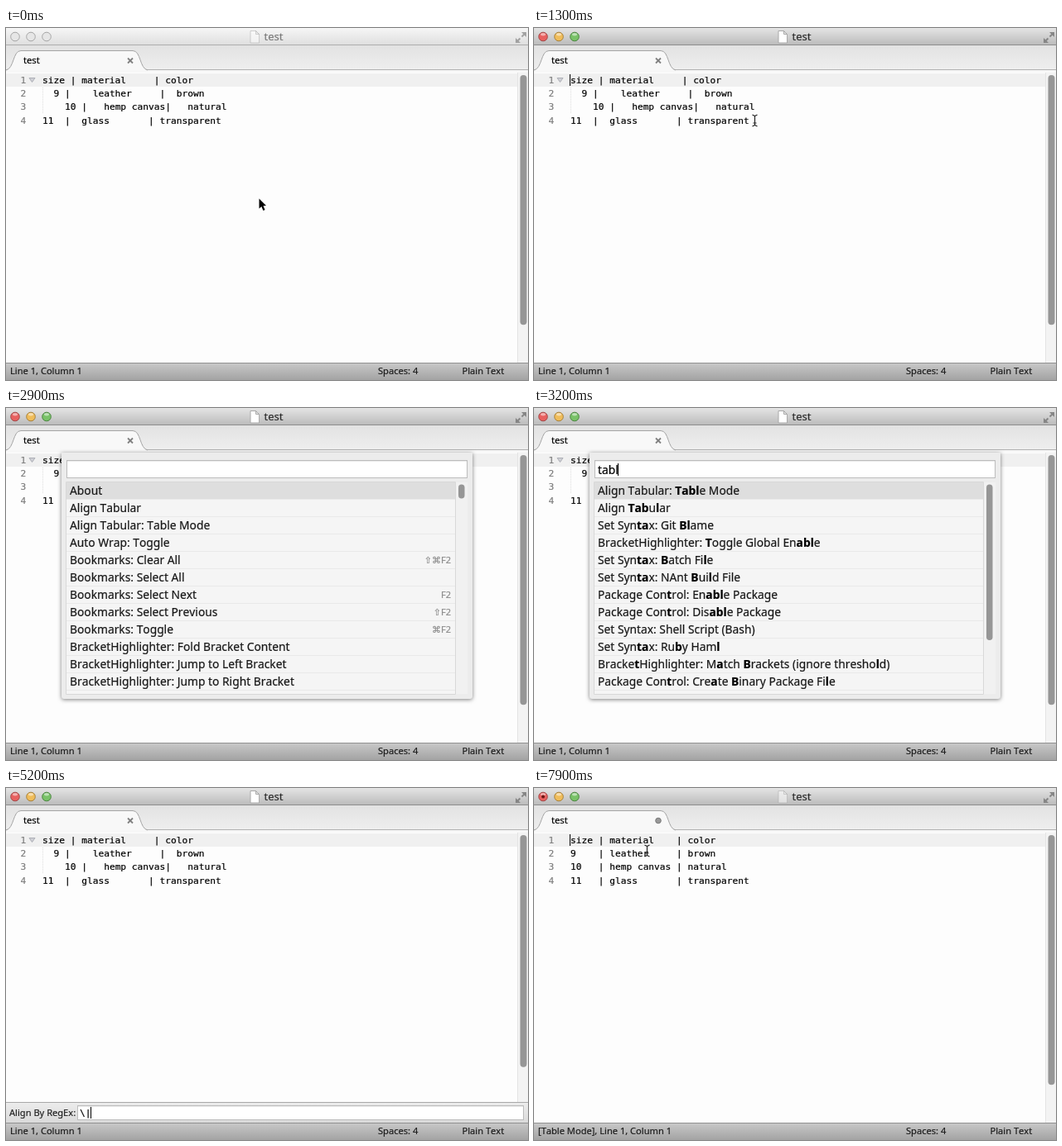
Recreate the animation shown at these times as an HTML page with a canvas. Size 630x426 px, loop 8 s.

```html
<!DOCTYPE html>
<html lang="en">
<head>
<meta charset="utf-8">
<title>Table alignment</title>
<style>
html, body { margin: 0; width: 100%; height: 100%; overflow: hidden; background: #fdfdfd; }
canvas { display: block; }
</style>
</head>
<body>
<canvas id="stage" width="630" height="426"></canvas>
<script>
const ctx = document.getElementById('stage').getContext('2d');
const LOOP = 8000;
const SANS = '"Noto Sans", "Open Sans", "DejaVu Sans", sans-serif';
const MONO = '11.2px "DejaVu Sans Mono", "Liberation Mono", monospace';
const LINE = 16.33, CHAR = 6.742;

const RAGGED = [
  'size | material     | color',
  '  9 |    leather     |  brown',
  '    10 |   hemp canvas|   natural',
  '11  |  glass       | transparent',
];
const ALIGNED = [
  'size | material    | color',
  '9    | leather     | brown',
  '10   | hemp canvas | natural',
  '11   | glass       | transparent',
];

// Asterisks enclose bold letters; a bar separates the shortcut.
const ALL_COMMANDS = [
  'About', 'Align Tabular', 'Align Tabular: Table Mode', 'Auto Wrap: Toggle',
  'Bookmarks: Clear All|⇧⌘F2', 'Bookmarks: Select All', 'Bookmarks: Select Next|F2',
  'Bookmarks: Select Previous|⇧F2', 'Bookmarks: Toggle|⌘F2',
  'BracketHighlighter: Fold Bracket Content', 'BracketHighlighter: Jump to Left Bracket',
  'BracketHighlighter: Jump to Right Bracket',
];
const TABL_COMMANDS = [
  'Align Tabular: *Tabl*e Mode', 'Align *Tab*u*l*ar', 'Set Syn*ta*x: Git *Bl*ame',
  'BracketHighlighter: *T*oggle Global En*abl*e', 'Set Syn*ta*x: *B*atch Fi*l*e',
  'Set Syn*ta*x: NAnt *B*ui*l*d File', 'Package Con*t*rol: En*abl*e Package',
  'Package Con*t*rol: Dis*abl*e Package', 'Set Syntax: Shell Script (Bash)',
  'Set Syn*ta*x: Ru*b*y Ham*l*', 'Bracke*t*Highlighter: M*a*tch *B*rackets (ignore thresho*l*d)',
  'Package Con*t*rol: Cre*a*te *B*inary Package Fi*l*e',
];
const TABLE_COMMANDS = [
  'Align Tabular: *Table* Mode', 'BracketHighlighter: *T*oggle Global En*able*',
  'Package Con*t*rol: En*able* Package', 'Package Con*t*rol: Dis*able* Package',
  'Set Syn*ta*x: Git *Bl*am*e*', 'Set Syn*ta*x: *B*atch Fi*le*', 'Set Syn*ta*x: NAnt *B*uild Fi*le*',
  'Package Con*t*rol: Cre*a*te *B*inary Package Fi*le*',
  'Bracke*t*Highlighter: Select Next *A*ttri*b*ute (*le*ft)',
];

const QUERY = [[2300, ''], [3000, 't'], [3100, 'tab'], [3200, 'tabl'], [3300, 'table']];
const REGEX = [[4700, ''], [5000, '\\'], [5100, '\\|'], [5600, '\\|/'], [5800, '\\|/l']];
const CARET_OFF = [[1600, 2100], [2800, 3000], [3800, 4000], [7000, 7500]];

const clamp = v => Math.max(0, Math.min(1, v));
const ease = v => v * v * (3 - 2 * v);
const between = (t, a, b) => t >= a && t < b;
const latest = (steps, t) => steps.filter(([start]) => t >= start).pop()[1];

function rect(x, y, w, h, fill) {
  ctx.fillStyle = fill;
  ctx.fillRect(x, y, w, h);
}
function gradient(x, y, w, h, top, bottom) {
  const g = ctx.createLinearGradient(0, y, 0, y + h);
  g.addColorStop(0, top);
  g.addColorStop(1, bottom);
  rect(x, y, w, h, g);
}
function rounded(x, y, w, h, r, fill) {
  ctx.beginPath();
  ctx.roundRect(x, y, w, h, r);
  ctx.fillStyle = fill;
  ctx.fill();
}
function path(points, fill, stroke, width = 1, close = true) {
  ctx.beginPath();
  points.forEach(([x, y]) => ctx.lineTo(x, y));
  if (close) ctx.closePath();
  if (fill) { ctx.fillStyle = fill; ctx.fill(); }
  if (stroke) { ctx.strokeStyle = stroke; ctx.lineWidth = width; ctx.stroke(); }
}
function circle(x, y, r, fill, stroke) {
  ctx.beginPath();
  ctx.arc(x, y, r, 0, 7);
  ctx.fillStyle = fill;
  ctx.fill();
  if (stroke) { ctx.strokeStyle = stroke; ctx.lineWidth = 1; ctx.stroke(); }
}
function text(str, x, y, font, color, align = 'left') {
  ctx.font = font;
  ctx.fillStyle = ctx.strokeStyle = color;
  ctx.textAlign = align;
  ctx.fillText(str, x, y);
  // A hairline gives the slightly heavy look of smoothed screen text.
  ctx.lineWidth = .2;
  ctx.strokeText(str, x, y);
  return ctx.measureText(str).width;
}
const sans = (size, bold) => `${bold ? 'bold ' : ''}${size}px ${SANS}`;

function caretAlpha(t) {
  return CARET_OFF.reduce((alpha, [off, on]) => Math.min(alpha,
    Math.max(clamp(1 - (t - off + 100) / 200), clamp((t - on + 100) / 200))), 1);
}
function caret(x, y, h, t) {
  ctx.globalAlpha = caretAlpha(t);
  rect(x, y, 1, h, '#000');
  ctx.globalAlpha = 1;
}

function drawTitleBar(active, modified) {
  if (active) gradient(0, 0, 630, 21, '#e4e4e4', '#bababa');
  else gradient(0, 0, 630, 21, '#f6f6f6', '#dedede');
  rect(0, 20, 630, 1, active ? '#8e8e8e' : '#adadad');
  const lights = [['#e8605f', '#a04a4a'], ['#f0bd5a', '#a5803c'], ['#79c268', '#4c8542']];
  lights.forEach(([fill, rim], i) => {
    const x = 11 + 19 * i;
    circle(x, 10.5, 5.3, active ? fill : '#e6e6e6', active ? rim : '#a6a6a6');
    if (active) {
      ctx.globalAlpha = .5;
      ctx.beginPath();
      ctx.ellipse(x, 7.8, 3, 1.7, 0, 0, 7);
      ctx.fillStyle = '#fff';
      ctx.fill();
      ctx.globalAlpha = 1;
    }
  });
  if (modified) circle(11, 10.5, 2, '#6b1613');

  ctx.globalAlpha = active && !modified ? 1 : .5;
  path([[295, 3.5], [301.5, 3.5], [305.5, 7.5], [305.5, 18], [295, 18]], '#fff', '#aaa');
  path([[301.5, 3.5], [301.5, 7.5], [305.5, 7.5]], '#e4e4e4', '#aaa');
  ctx.globalAlpha = 1;
  text('test', 311.5, 15, sans(13), active ? '#2c2c2c' : '#7b7b7b');

  const arrows = active ? '#868686' : '#a2a2a2';
  path([[622, 5], [628, 5], [628, 11]], arrows);
  path([[615, 12], [615, 18], [621, 18]], arrows);
  path([[622.5, 10.5], [626, 7]], null, arrows, 2, false);
  path([[617, 16], [620.5, 12.5]], null, arrows, 2, false);
}

function drawTabs(modified) {
  gradient(0, 21, 630, 29, '#e2e2e2', '#eeeeee');
  rect(0, 50, 630, 1, '#b0b0b0');
  rect(0, 51, 630, 3, '#f7f7f7');
  ctx.beginPath();
  ctx.moveTo(0, 51);
  ctx.bezierCurveTo(10, 49, 8, 27.5, 18, 27.5);
  ctx.lineTo(153, 27.5);
  ctx.bezierCurveTo(163, 27.5, 161, 49, 171, 51);
  ctx.fillStyle = '#f8f8f8';
  ctx.fill();
  ctx.strokeStyle = '#a4a4a4';
  ctx.lineWidth = 1;
  ctx.stroke();
  text('test', 21, 43, sans(11.2), '#000');
  if (modified) return circle(150, 39.5, 3.3, '#999', '#777');
  path([[147, 36.5], [153, 42.5]], null, '#808080', 1.8, false);
  path([[153, 36.5], [147, 42.5]], null, '#808080', 1.8, false);
}

function drawEditor(t, aligned, bottom) {
  rect(0, 54, 617, bottom - 54, '#fdfdfd');
  rect(0, 55, 617, 16, '#f0f0f0');
  if (!aligned) {
    for (let y = 72; y < 104; y += 2) rect(44, y, 1, 1, '#dedede');
    path([[28, 60.5], [35, 60.5], [31.5, 65.5]], '#cfd0d6', '#adafb6');
  }
  (aligned ? ALIGNED : RAGGED).forEach((line, i) => {
    const y = 66.7 + i * LINE;
    text(i + 1, 24.3, y, MONO, '#7d7d7d', 'right');
    // Placing every word on its column keeps the grid exact.
    for (const word of line.matchAll(/\S+/g)) text(word[0], 44 + word.index * CHAR, y, MONO, '#000');
  });

  rect(617, 54, 13, bottom - 54, '#f3f3f3');
  rect(617, 54, 1, bottom - 54, '#e4e4e4');
  rounded(620.5, 57, 8, (bottom - 54) * .861, 4, '#969696');
}

function drawStatus(aligned) {
  gradient(0, 405, 630, 21, '#c9c9c9', '#a3a3a3');
  rect(0, 405, 630, 1, '#909090');
  const label = (str, x) => text(str, x, 419.3, sans(11.1), '#1c1c1c');
  label((aligned ? '[Table Mode], ' : '') + 'Line 1, Column 1', 5);
  label('Spaces: 4', 449);
  label('Plain Text', 550.5);
}

function inputBox(x, y, w, h) {
  rect(x, y, w, h, '#bcbcbc');
  rect(x + 1, y + 1, w - 2, h - 2, '#fff');
  rect(x + 1, y + 1, w - 2, 1, '#ececec');
}

function drawPalette(t) {
  const query = latest(QUERY, t);
  const short = query === 'table';
  const commands = short ? TABLE_COMMANDS : query ? TABL_COMMANDS : ALL_COMMANDS;
  const bottom = short ? 286 : 352;
  const listEnd = bottom - (short ? 7 : 6);
  const listWidth = short ? 484 : 469;

  ctx.save();
  ctx.shadowColor = 'rgba(0,0,0,.5)';
  ctx.shadowBlur = 5;
  ctx.shadowOffsetY = 1;
  rounded(67, 54, 496, bottom - 54, [0, 0, 3, 3], '#ececec');
  ctx.restore();

  inputBox(73, 63, 484, 22);
  const width = text(query, 77, 79.5, sans(13.8), '#000');
  caret(Math.floor(77 + width), 67, 15, t);

  rect(73, 90, listWidth, listEnd - 90, '#f5f5f5');
  commands.forEach((command, i) => {
    const y = 90 + 21 * i;
    const [name, keys] = command.split('|');
    if (i === 0) rect(73, y, listWidth, 21, '#dedede');
    rect(73, y + 20, listWidth, 1, '#e9e9e9');
    let x = 77;
    name.split('*').forEach((part, n) => {
      x += text(part, x, y + 15, sans(13.8, n % 2), n % 2 ? '#000' : '#181818');
    });
    if (keys) text(keys, 537, y + 14, sans(11), '#8c8c8c', 'right');
  });
  ctx.strokeStyle = '#d8d8d8';
  ctx.lineWidth = 1;
  ctx.strokeRect(72.5, 89.5, listWidth + 1, listEnd - 89);
  if (!short) {
    rect(543, 90, 14, listEnd - 90, '#f1f1f1');
    rounded(546, 92.5, 7.5, query ? 188.5 : 17, 3.75, '#969696');
  }
}

function drawRegexPanel(t) {
  gradient(0, 380, 630, 25, '#ededed', '#dadada');
  rect(0, 380, 630, 1, '#a8a8a8');
  text('Align By RegEx:', 4, 397, sans(11.1), '#222');
  inputBox(86, 384, 539, 18);
  const regex = latest(REGEX, t);
  text(regex, 89, 397, MONO, '#000');
  caret(Math.round(89 + regex.length * CHAR), 386, 14, t);
}

function drawArrow(x, y) {
  const outline = [[0, 0], [0, 12], [2.8, 9.6], [5, 14.4], [7, 13.5], [4.9, 8.8], [8.5, 8.5]]
    .map(([dx, dy]) => [x + dx, y + dy]);
  path(outline, '#000', '#fff');
  path(outline, '#000');
}
function drawBeam(x, y) {
  for (const side of [-1, 1]) {
    path([[x - 3, y + side * 7], [x, y + side * 5.5], [x + 3, y + side * 7]], null, '#222', 1.2, false);
  }
  path([[x, y - 6], [x, y + 6]], null, '#222', 1.2, false);
  path([[x - 2, y + 3], [x + 2, y + 3]], null, '#222', 1, false);
}
function drawPointer(t) {
  const move = (a, b, k) => a + (b - a) * ease(clamp(k));
  if (t < 1100) {
    const k = (t - 400) / 600;
    drawArrow(move(305.5, 266, k), move(206.5, 108, k));
  } else if (t < 2300) {
    drawBeam(266.5, 112);
  } else if (t >= 7200) {
    const k = (t - 7100) / 700;
    drawBeam(move(249, 136.5, k), move(113, 76, k));
  }
}

function draw(t) {
  const active = t >= 1100;
  const aligned = t >= 6700;
  const palette = between(t, 2300, 4700);
  const panel = between(t, 4700, 6400);
  ctx.clearRect(0, 0, 630, 426);
  drawTitleBar(active, aligned);
  drawTabs(aligned);
  drawEditor(t, aligned, panel ? 380 : 405);
  if (active && !palette && !panel) caret(43, 56, 14, t);
  drawStatus(aligned);
  if (palette) drawPalette(t);
  if (panel) drawRegexPanel(t);
  drawPointer(t);
}

ctx.fontKerning = 'none';
ctx.lineJoin = 'round';
let start;
function tick(now) {
  start ??= now;
  draw(Math.floor(((now - start) % LOOP) / 100) * 100);
  requestAnimationFrame(tick);
}
requestAnimationFrame(tick);
</script>
</body>
</html>
```
